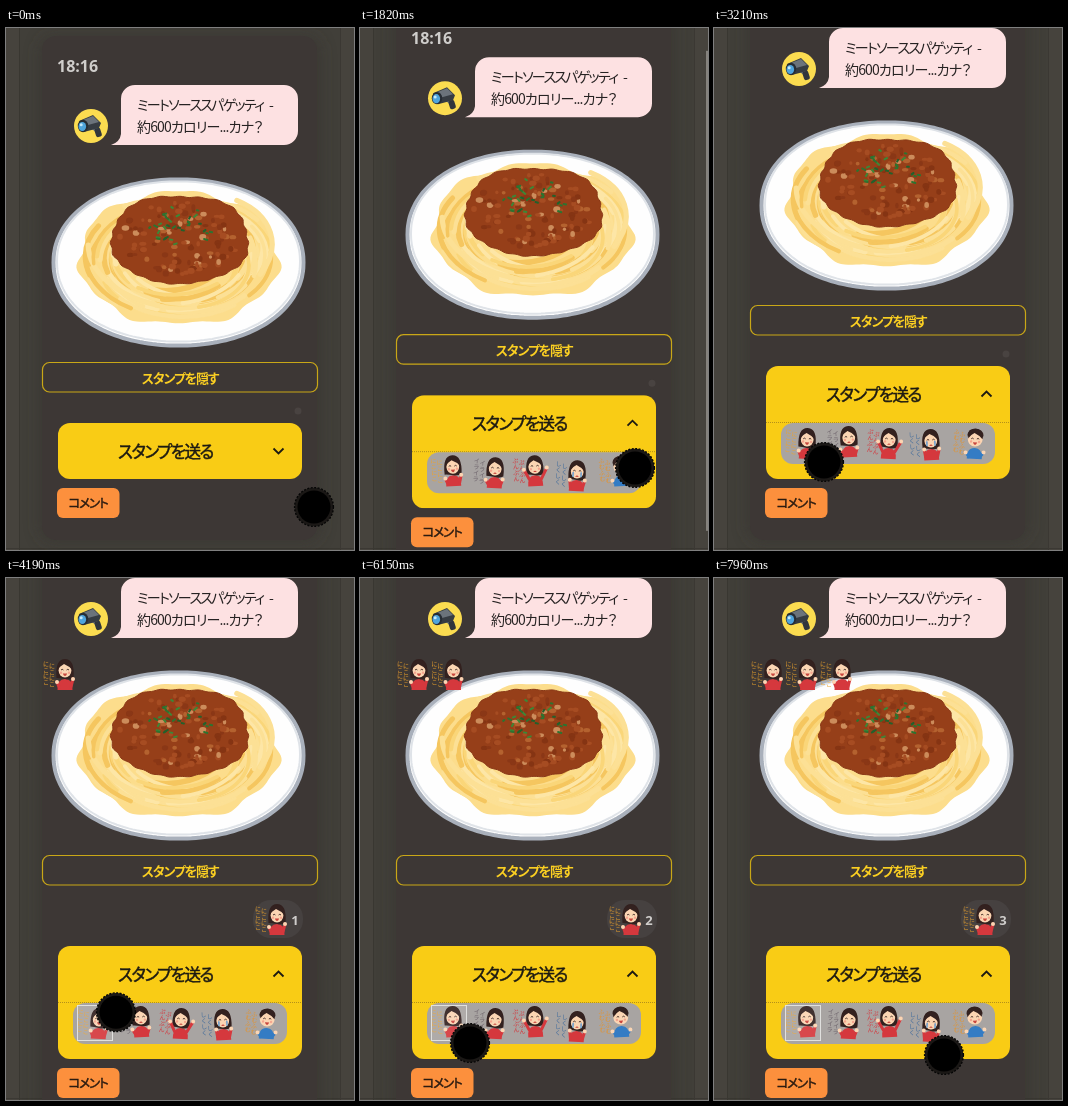
Animation of 348x522 px, one loop 8000 ms. Source, as an HTML page:

```html
<!DOCTYPE html>
<html lang="ja">
<head>
<meta charset="utf-8">
<title>Stamp panel</title>
<style>
  html, body { margin: 0; width: 348px; height: 522px; overflow: hidden; background: #46433d; }
  svg { display: block; }
  text { font-family: "Noto Sans CJK JP", "Noto Sans CJK", sans-serif; font-feature-settings: "palt"; letter-spacing: -.09em; }
  .mid { text-anchor: middle; }
  .medium { stroke-width: .45; }
  .num { font-family: "Noto Sans", "Open Sans", sans-serif; font-weight: 600; letter-spacing: 0; fill: #cfcdcb; }
  .tiny { font-size: 6px; letter-spacing: 0; }
</style>
</head>
<body>
<svg width="348" height="522" viewBox="0 0 348 522">
  <defs>
    <filter id="shadow" x="-30%" y="-10%" width="160%" height="120%"><feGaussianBlur stdDeviation="8"/></filter>
    <clipPath id="panelClip"><rect id="clipBox" x="52" y="395" width="244" height="56" rx="12"/></clipPath>
  </defs>
  <rect width="348" height="522" fill="#46433d"/>
  <rect x="13" width="321" height="522" fill="#413f39"/>
  <path d="M13.5 0V522M334.5 0V522M0 520.5H348" stroke="#37342f" opacity=".7"/>

  <g id="page">
    <rect id="cardShadow" x="34" y="9" width="280" height="504" rx="14" fill="#35312d" opacity=".6" filter="url(#shadow)"/>
    <rect id="card" x="36" y="8" width="275" height="504" rx="14" fill="#3d3735"/>
    <text class="num" x="51" y="44" font-size="16">18:16</text>

    <g id="avatar">
      <circle cx="85" cy="98" r="17" fill="#fbdc50"/>
      <path d="M86 99l7 5" stroke="#6f7880" stroke-width="3.5"/>
      <rect x="89" y="100" width="6" height="9" rx="2" fill="#30363c" transform="rotate(-18 92 104)"/>
      <path d="M73 93l14-6 8 8-2 5-15 4z" fill="#363c42"/>
      <path d="M77 92l10-4 6 6-11 3z" fill="#6b737b"/>
      <ellipse cx="77" cy="98" rx="5.2" ry="6.2" fill="#272d34"/>
      <ellipse cx="76.3" cy="98.5" rx="3.8" ry="4.6" fill="#4fa5dc"/>
      <circle cx="75.2" cy="96.8" r="1.5" fill="#c4e9fb"/>
    </g>

    <path d="M129 57H278a14 14 0 0 1 14 14V103a14 14 0 0 1-14 14H105q9-3 10-11V71a14 14 0 0 1 14-14z" fill="#fde1e2"/>
    <g font-size="14" fill="#262222">
      <text x="131" y="82" style="letter-spacing:-.12em;word-spacing:.3em">ミートソーススパゲッティ -</text>
      <text x="131" y="104" style="letter-spacing:-.06em">約600カロリー...カナ？</text>
    </g>

    <g id="dish"></g>

    <rect x="36.5" y="334.5" width="275" height="29.5" rx="7" fill="none" stroke="#c9a717" stroke-width="1.2"/>
    <text class="mid" x="174" y="354.5" font-size="13" font-weight="700" fill="#fbcf22">スタンプを隠す</text>

    <circle id="dot" cx="292" cy="383" r="3.5" fill="#494341"/>
    <g id="badge">
      <rect x="247" y="379" width="50" height="38" rx="18" fill="#464140"/>
      <g id="badgeStamp" transform="translate(266 399)"></g>
      <text id="count" class="num mid" x="289" y="404" font-size="13"></text>
    </g>
    <g id="placed"></g>

    <g id="panel">
      <g clip-path="url(#panelClip)">
        <rect x="52" y="395" width="244" height="113" fill="#f9cc15"/>
        <path d="M52 451.5H296" stroke="#b3901a" stroke-dasharray="1 1"/>
        <rect x="67" y="452" width="214" height="41" rx="12" fill="#a8a4a2"/>
        <g id="tray"></g>
        <rect id="focus" x="71.5" y="454.5" width="35" height="35" fill="#fff" fill-opacity=".08" stroke="#e0e0de"/>
      </g>
      <text class="mid medium" x="159.5" y="429.5" font-size="16.5" fill="#1d1a12" stroke="#1d1a12">スタンプを送る</text>
      <path id="chevron" fill="none" stroke="#1d1a12" stroke-width="1.8"/>
      <g id="comment">
        <rect x="51" y="460" width="62.5" height="30" rx="6" fill="#fc903d"/>
        <text class="mid medium" x="82" y="480" font-size="12.5" fill="#2b1b10" stroke="#2b1b10">コメント</text>
      </g>
    </g>
  </g>

  <rect id="thumb" x="346" width="2" height="480" fill="#85827d"/>
  <g id="cursor">
    <circle r="19.3" fill="#1b1816"/>
    <circle r="19.4" fill="none" stroke="#050505" stroke-width="1.4" stroke-dasharray="2 1.5"/>
    <circle r="16.5"/>
  </g>
</svg>
<script>
const $ = id => document.getElementById(id);
const put = (id, attrs) => { for (const k in attrs) $(id).setAttribute(k, attrs[k]); };
const show = (id, on) => put(id, { visibility: on ? 'visible' : 'hidden' });

// Seeded random number between a and b.
let seed = 7;
function rnd(a = 0, b = 1) {
  seed = (seed + 0x6D2B79F5) | 0;
  let n = Math.imul(seed ^ (seed >>> 15), 1 | seed);
  n = (n + Math.imul(n ^ (n >>> 7), 61 | n)) ^ n;
  return a + (b - a) * ((n ^ (n >>> 14)) >>> 0) / 4294967296;
}
const pick = list => list[Math.floor(rnd(0, list.length))];

// Closed outline from a radius rule; power above 2 makes it boxier.
function blob(cx, cy, rx, ry, power, wave = () => 0) {
  let d = '';
  for (let i = 0; i < 180; i++) {
    const a = i * Math.PI / 90, c = Math.cos(a), s = Math.sin(a);
    const r = (1 + wave(a)) / (Math.abs(c) ** power + Math.abs(s) ** power) ** (1 / power);
    d += `${i ? 'L' : 'M'}${(cx + rx * r * c).toFixed(1)} ${(cy + ry * r * s).toFixed(1)}`;
  }
  return d + 'z';
}

function noodle(color) {
  const k = rnd(.55, .88), cx = 173 + rnd(-9, 9), cy = 230 + rnd(-6, 6);
  const rx = 103 * k, ry = 67 * k, a = rnd(0, 6.28), b = a + rnd(.5, 1.5);
  const at = v => `${(cx + rx * Math.cos(v)).toFixed(1)} ${(cy + ry * Math.sin(v)).toFixed(1)}`;
  return `<path d="M${at(a)}A${rx} ${ry} 0 0 1 ${at(b)}" stroke="${color}" stroke-width="${rnd(3.5, 5.5)}" transform="rotate(${rnd(-9, 9)} 173 230)"/>`;
}

function dish() {
  let s = `<path d="${blob(172.5, 234.5, 125, 83, 2.1)}" fill="#fefefe" stroke="#a9b0bb" stroke-width="4"/>
    <path d="${blob(172.5, 233.5, 121.5, 80, 2.1)}" fill="none" stroke="#dfe3e8" stroke-width="2"/>
    <path d="${blob(173, 230, 99, 66, 2.1, a => .03 * Math.sin(7 * a) + .02 * Math.sin(13 * a))}" fill="#fcdd8c"/>
    <g fill="none" stroke-linecap="round">`;
  for (let i = 0; i < 90; i++) s += noodle(pick(['#f5c65f', '#fad679', '#fce095', '#fde6a6']));
  s += `</g><path d="${blob(174, 211.5, 68, 43.5, 2.3, a => .012 * Math.sin(23 * a) + .02 * Math.sin(5 * a - .4))}" fill="#963f19" stroke="#8a3817"/>`;
  for (let i = 0; i < 120; i++) {
    const a = rnd(0, 6.28), r = Math.sqrt(rnd()) * .92;
    const fill = pick(['#a64c22', '#a64c22', '#853413', '#8a3716', '#b4622f', '#cc8c5b']);
    s += `<ellipse cx="${174 + 66 * r * Math.cos(a)}" cy="${211 + 41 * r * Math.sin(a)}" rx="${rnd(1.6, 3.8)}" ry="${rnd(1.5, 3.2)}" fill="${fill}"/>`;
  }
  for (let i = 0; i < 34; i++) {
    const a = rnd(0, 6.28), r = Math.sqrt(rnd());
    const x = 172 + 32 * r * Math.cos(a), y = 198 + 21 * r * Math.sin(a);
    s += `<rect x="${x}" y="${y}" width="${rnd(3, 5.5)}" height="2" rx=".7" fill="${pick(['#2d7330', '#3c8737', '#23602b'])}" transform="rotate(${rnd(-60, 60)} ${x} ${y})"/>`;
  }
  return s;
}

// Small figure with a repeated word written down its left side.
function stamp({ word, ink, shirt = '#d5383d', man, arms, mouth, tears }) {
  const hair = '#33211f', skin = '#fbd5b3';
  const label = [-14, -8].map((x, col) => [...word + word].map((ch, row) =>
    `<text class="tiny mid" x="${x}" y="${-9 + row * 6 + col * 2}" fill="${ink}">${ch}</text>`).join('')).join('');
  const hands = arms.split('M').slice(1).map(p => {
    const [x, y] = p.trim().split(' ').slice(-2);
    return `<circle cx="${x}" cy="${y}" r="2" fill="${skin}"/>`;
  }).join('');
  const locks = man
    ? `<ellipse cy="-9" rx="8" ry="6.5" fill="${hair}"/>`
    : `<path d="M-8.5 3Q-10-16 0-16T8.5 3Q5 5 0 4T-8.5 3z" fill="${hair}"/>`;
  return `${label}<g transform="translate(5 0)">
    <path d="M-7.5 15Q-8 4 0 4T7.5 15z" fill="${shirt}"/>
    ${locks}
    <ellipse cy="-4.5" rx="${man ? 7.4 : 6.4}" ry="7" fill="${skin}"/>
    <path d="M-7.2-5Q-5-9-1-11Q4-9 7.2-5Q8-15 0-15T-7.2-5z" fill="${hair}"/>
    <path d="M-4-5q1.2-1.4 2.4 0M1.6-5q1.2-1.4 2.4 0" fill="none" stroke="#3a2520" stroke-width=".9"/>
    <circle cx="-4" cy="-2.2" r="1.2" fill="#f5a58f"/><circle cx="4" cy="-2.2" r="1.2" fill="#f5a58f"/>
    <path d="${mouth}" fill="#c9453d"/>
    ${tears ? '<path d="M-4-4v5M4-4v5" stroke="#5fa6dc" stroke-width="1.4"/>' : ''}
    <path d="${arms}" fill="none" stroke="${shirt}" stroke-width="3" stroke-linecap="round"/>${hands}
  </g>`;
}

const smile = 'M-2.2-1.5h4.4q-1 2.6-2.2 2.6t-2.2-2.6z', frown = 'M-1.8 .8q1.8-2.6 3.6 0z';
const kinds = [
  { x: 88, word: 'にこ', ink: '#eda32c', arms: 'M -6 12 L -8 7 M 6 12 L 8 4', mouth: smile },
  { x: 130, word: 'イラ', ink: '#6a6068', arms: 'M -6 12 L -9 7 M 6 12 L 8 6', mouth: frown },
  { x: 170, word: 'ぷん', ink: '#d5353b', arms: 'M -6 8 L -11 -2 M 6 8 L 12 -3', mouth: frown },
  { x: 212, word: 'しく', ink: '#3e6a9c', arms: 'M -6 12 L -7 4 M 6 12 L 8 4', mouth: frown, tears: true },
  { x: 256, word: 'ふむ', ink: '#e5932c', shirt: '#347cc4', man: true, arms: 'M -6 12 L -9 9 M 6 12 L 9 8', mouth: smile }
];

$('dish').innerHTML = dish();
$('tray').innerHTML = kinds.map((k, i) => `<g id="kind${i}">${stamp(k)}</g>`).join('');
$('badgeStamp').innerHTML = stamp(kinds[0]);
$('placed').innerHTML = [0, 1, 2].map(i => `<g id="sticker${i}" transform="translate(${54 + i * 34.5} 154)">${stamp(kinds[0])}</g>`).join('');

const LOOP = 8000, STEP = 139.5;
const clicks = [3980, 4960, 6200];
const path = [[0, 308, 479], [280, 308, 479], [830, 275, 440],
  [2370, 275, 440], [3200, 110, 434], [4180, 110, 434], [4740, 110, 465],
  [6270, 110, 465], [6970, 134, 478], [7950, 230, 477]];
const open = [[830, 0], [1110, 57]];
const scroll = [[1530, 0], [2090, 55], [2370, 57]];

// Value at time t, column c, between the nearest steps of a table.
function at(table, t, c = 1) {
  const n = table.findIndex(row => row[0] > t);
  if (n < 0) return table[table.length - 1][c];
  if (n === 0) return table[0][c];
  const a = table[n - 1], b = table[n];
  return a[c] + (b[c] - a[c]) * (t - a[0]) / (b[0] - a[0]);
}

function draw(t) {
  const tick = Math.floor(t / STEP);
  t = tick * STEP;
  const grow = at(open, t), top = at(scroll, t);
  const count = clicks.filter(c => t >= c).length;
  const shift = count ? 30 : 0;

  put('page', { transform: `translate(0 ${-top})` });
  put('card', { height: 504 + grow + shift });
  put('cardShadow', { height: 504 + grow + shift });
  put('panel', { transform: `translate(0 ${shift})` });
  put('clipBox', { height: 56 + grow });
  put('comment', { transform: `translate(0 ${grow})` });
  put('chevron', { d: grow > 20 ? 'M267.5 425.5l5-5 5 5' : 'M267.5 420.5l5 5 5-5' });

  kinds.forEach((k, i) => {
    const sway = Math.floor(tick / 2 + i) % 2 ? 1 : -1;
    const drop = i === 3 ? 3 : 0;
    put('kind' + i, { transform: `translate(${k.x} ${472 + drop + sway * .7}) rotate(${sway * 3})` });
  });
  for (let i = 0; i < 3; i++) show('sticker' + i, count > i);
  show('badge', count);
  show('dot', !count);
  show('focus', count);
  $('count').textContent = count || '';

  show('thumb', t > 1540 && t < 2700);
  put('thumb', { y: top * .82 });
  put('cursor', { transform: `translate(${at(path, t)} ${at(path, t, 2)})` });
}

const start = performance.now();
function loop() {
  draw((performance.now() - start) % LOOP);
  requestAnimationFrame(loop);
}
loop();
</script>
</body>
</html>
```
